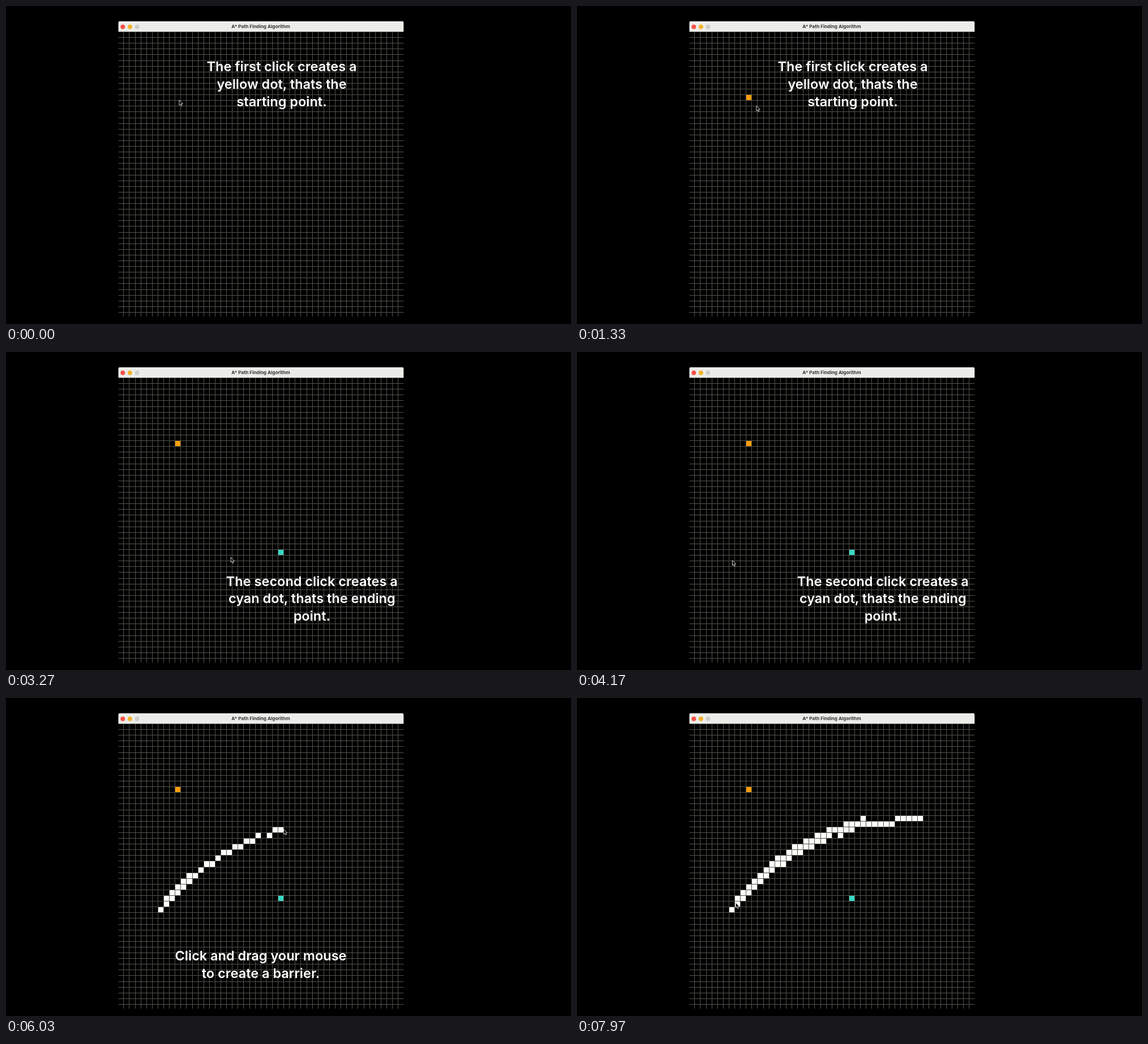
These frames come from a looping animation (998x561 px, 8000 ms). An HTML page with a canvas:

```html
<!DOCTYPE html>
<html lang="en">
<head>
<meta charset="utf-8">
<title>A* Path Finding Algorithm</title>
<style>
  html, body { margin: 0; width: 100%; height: 100%; overflow: hidden; background: #000; }
  canvas, svg { position: absolute; left: 0; top: 0; width: 998px; height: 561px; }
  text { font: 600 23.5px Inter, sans-serif; fill: #fff; text-anchor: middle; }
  .title { font-size: 8.2px; font-weight: 700; fill: #353535; font-feature-settings: 'calt' 0; }
</style>
</head>
<body>
<canvas id="stage" width="998" height="561"></canvas>
<svg viewBox="0 0 998 561">
  <text class="title" x="450" y="39.4">A* Path Finding Algorithm</text>
  <g class="caption" data-from="0" data-to="1650">
    <text x="487" y="115.3">The first click creates a</text>
    <text x="487" y="146">yellow dot, thats the</text>
    <text x="487" y="176.7">starting point.</text>
  </g>
  <g class="caption" data-from="2720" data-to="4500">
    <text x="540.3" y="412.5">The second click creates a</text>
    <text x="540.3" y="443.2">cyan dot, thats the ending</text>
    <text x="540.3" y="473.9">point.</text>
  </g>
  <g class="caption" data-from="5250" data-to="7150">
    <text x="450" y="463.3">Click and drag your mouse</text>
    <text x="450" y="494">to create a barrier.</text>
  </g>
</svg>
<script>
const ctx = document.getElementById('stage').getContext('2d');
const captions = document.querySelectorAll('.caption');
const LOOP = 8000;
const LEFT = 198.5, TOP = 27, RIGHT = 702.3, BOTTOM = 548, BAR = 45.4;
const PITCH = 10.1, CELLS = 50;
const FIRST_COL = 7, LAST_COL = 40;
const PAINT_START = 5000, TURN = 7050;
const WHITE = '#fffffa';
const arrow = new Path2D('M0.4 0.4V9.4L2.4 7.6L3.9 10.9L5.4 10.2L4 7H6.8Z');

const toX = col => 197.2 + PITCH * col;
const toY = row => 45 + PITCH * row;
const mix = (a, b, k) => a + (b - a) * k;

function ease(t, from, to) {
  const k = Math.min(1, Math.max(0, (t - from) / (to - from)));
  return k * k * (3 - 2 * k);
}

// Row of the hand-drawn barrier arc at a (fractional) column.
function arcRow(col) {
  const u = Math.min(1, (col - FIRST_COL) / (LAST_COL - FIRST_COL));
  return 16.3 + 15.2 * (1 - u) ** 2.4 + 0.5 * Math.sin(Math.PI * u) ** 2;
}

// Column of the pointer while it drags out and back along the arc.
const dragCol = t => mix(7.1, 39.9, ease(t, 4560, 7000) - ease(t, TURN, 8050));
const arcPoint = col => [toX(col + 0.5), toY(arcRow(col) + 0.5)];

function pointerAt(t) {
  if (t > 4500) return arcPoint(dragCol(t));
  const moves = [
    [0, 350, [303, 161.5]],
    [1150, 2250, [489, 357.5]],
    [2900, 3720, arcPoint(7.1)]
  ];
  return moves.reduce(([x, y], [from, to, goal]) => {
    const k = ease(t, from, to);
    return [mix(x, goal[0], k), mix(y, goal[1], k)];
  }, [305.5, 165.5]);
}

function fillCell(col, row, color) {
  const x = Math.round(toX(col)), y = Math.round(toY(row));
  ctx.fillStyle = color;
  ctx.fillRect(x, y, Math.round(toX(col + 1)) - x, Math.round(toY(row + 1)) - y);
}

function drawBarrier(t) {
  if (t < PAINT_START) return;
  const reach = dragCol(t), returning = t > TURN;
  for (let col = FIRST_COL + 1; col <= LAST_COL; col++) {
    const row = Math.round(arcRow(col));
    // The slow start covers every row it crosses; the fast middle skips columns.
    const spread = col < 13 ? 0.45 : 0;
    const skipped = col > 24 && col < 32 && col % 4 === 1;
    if (!skipped && (returning || reach >= col - 0.3)) {
      const lowest = Math.round(arcRow(col - spread));
      for (let r = Math.round(arcRow(col + spread)); r <= lowest; r++) fillCell(col, r, WHITE);
    }
    if (returning && col > 10 && col < 31 && reach <= col + 0.5) fillCell(col, row - 1, WHITE);
  }
}

function drawGrid() {
  ctx.fillStyle = '#53544b';
  for (let i = 1; i < CELLS; i++) {
    ctx.fillRect(Math.round(toX(i)), BAR, 1, BOTTOM - BAR);
    ctx.fillRect(LEFT, Math.round(toY(i)), RIGHT - LEFT, 1);
  }
}

function drawTitleBar() {
  ctx.fillStyle = '#ecede9';
  ctx.beginPath();
  ctx.roundRect(LEFT, TOP, RIGHT - LEFT, BAR - TOP, [2, 2, 0, 0]);
  ctx.fill();
  ['#fb5149', '#f4b22b', '#cdcdca'].forEach((color, i) => {
    ctx.fillStyle = color;
    ctx.beginPath();
    ctx.arc(206.3 + 12.6 * i, 36.7, 4, 0, Math.PI * 2);
    ctx.fill();
  });
}

function drawPointer([x, y]) {
  ctx.save();
  ctx.translate(x, y);
  ctx.fillStyle = '#000';
  ctx.strokeStyle = '#e4e4e4';
  ctx.lineWidth = 0.9;
  ctx.fill(arrow);
  ctx.stroke(arrow);
  ctx.restore();
}

function draw(t) {
  ctx.fillStyle = '#000';
  ctx.fillRect(0, 0, 998, 561);
  if (t >= 470) fillCell(10, 11, '#ff9c08');
  if (t >= 2600) fillCell(28, 30, '#37d8c5');
  if (t >= 4400) fillCell(FIRST_COL, 32, WHITE);
  drawBarrier(t);
  drawGrid();
  drawTitleBar();
  drawPointer(pointerAt(t));
  for (const { style, dataset } of captions)
    style.visibility = t >= +dataset.from && t < +dataset.to ? 'visible' : 'hidden';
}

const start = performance.now();
function tick() {
  draw((performance.now() - start) % LOOP);
  requestAnimationFrame(tick);
}
tick();
</script>
</body>
</html>
```
